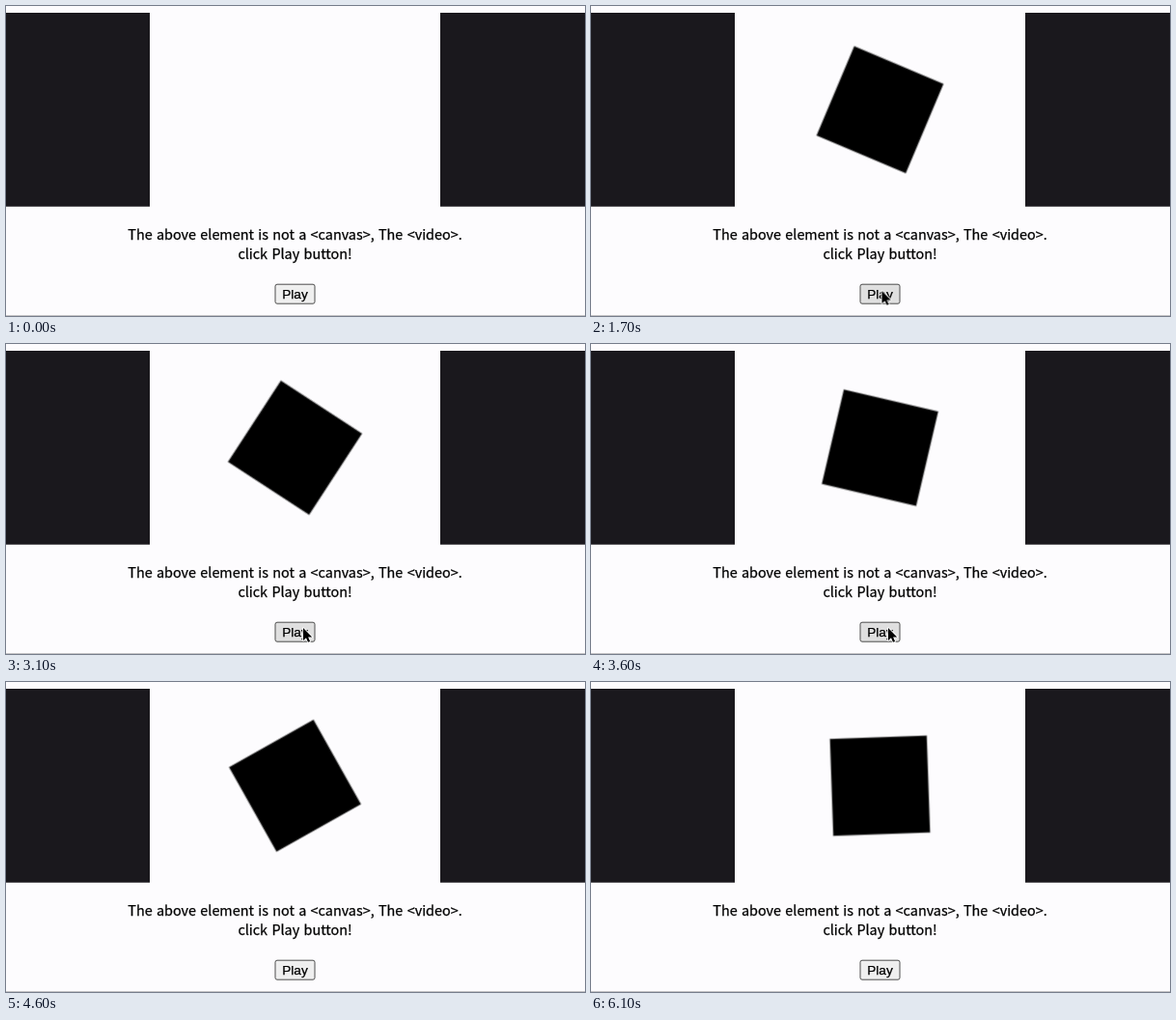
Recreate the animation shown at these times as an HTML page. Size 600 by 321 pixels, loop 6200 ms.

```html
<!DOCTYPE html>
<html lang="en">
<head>
<meta charset="utf-8">
<title>Rotating square</title>
<style>
  html, body { margin: 0; width: 100%; height: 100%; overflow: hidden; background: #fdfcfe; }
  svg { display: block; width: 600px; height: 321px; }

  .panel { fill: #1a181d; }
  .copy {
    font: 14.4px "Noto Sans CJK KR", "Noto Sans CJK JP", "Noto Sans CJK SC", sans-serif;
    word-spacing: 1.1px;
  }
  .label { font: 13.6px "Liberation Sans", Arial, sans-serif; }
  .copy, .label { text-anchor: middle; fill: #000; stroke: #000; stroke-width: .25px; }

  .square, .face, .cursor { animation: 6200ms step-end infinite; }
  .square { animation-name: spin; }
  .face { fill: #efefef; stroke: #4c4c4c; animation-name: hover; }
  .cursor { animation-name: point; }

  /* Hidden until playback, then one pose every 100 ms */
  @keyframes spin {
    0% { visibility: hidden; transform: rotate(0deg); }
    24.19% { visibility: visible; transform: rotate(0deg); animation-timing-function: steps(2); }
    27.41% { visibility: visible; transform: rotate(22.9deg); animation-timing-function: steps(8); }
    40.32% { transform: rotate(130.7deg); animation-timing-function: steps(6); }
    49.99% { transform: rotate(213.1deg); animation-timing-function: steps(9); }
    64.51% { transform: rotate(339.2deg); animation-timing-function: steps(13); }
    85.48% { transform: rotate(515.7deg); animation-timing-function: steps(8); }
    98.38%, 100% { visibility: visible; transform: rotate(628deg); }
  }

  @keyframes hover {
    0%, 66.12%, 100% { fill: #efefef; }
    14.51% { fill: #dfdfdf; }
  }

  @keyframes point {
    0% { visibility: hidden; transform: translate(441px, 233px); }
    9.67% { visibility: visible; transform: translate(441px, 233px); }
    11.29% { transform: translate(385px, 258px); }
    12.9% { transform: translate(345px, 281px); }
    14.51% { transform: translate(318px, 291px); }
    16.12% { transform: translate(306px, 292px); }
    19.35% { transform: translate(301.5px, 294px); }
    20.96% { transform: translate(301.5px, 295px); }
    33.87% { transform: translate(305px, 294.5px); }
    35.48% { transform: translate(308px, 294px); }
    61.29% { transform: translate(312px, 292px); }
    62.9% { transform: translate(317px, 288px); }
    64.51% { transform: translate(322.5px, 280.5px); }
    66.12% { visibility: visible; transform: translate(345px, 235px); }
    67.74%, 100% { visibility: hidden; transform: translate(345px, 235px); }
  }
</style>
</head>
<body>
<svg viewBox="0 0 600 321">
  <rect class="panel" y="7" width="149" height="200.7"/>
  <rect class="panel" x="450" y="7" width="150" height="200.7"/>

  <g transform="translate(299.5 107.4)">
    <rect class="square" x="-50" y="-50" width="100" height="100" stroke="#444" stroke-width=".8"/>
  </g>

  <text class="copy" x="299.5" y="242">The above element is not a &lt;canvas&gt;, The &lt;video&gt;.</text>
  <text class="copy" x="299.5" y="261.7">click Play button!</text>

  <rect class="face" x="279" y="288.2" width="41" height="20" rx="2"/>
  <text class="label" x="299.5" y="302.7">Play</text>

  <rect y="320" width="600" height="1" fill="#c4c4c6"/>

  <path class="cursor" d="M0 0V13L3 10.2 5 14.8 7.1 13.9 5.1 9.4H9.2Z"
        stroke="#fff" stroke-width="1.6" stroke-linejoin="round" paint-order="stroke"/>
</svg>
</body>
</html>
```
